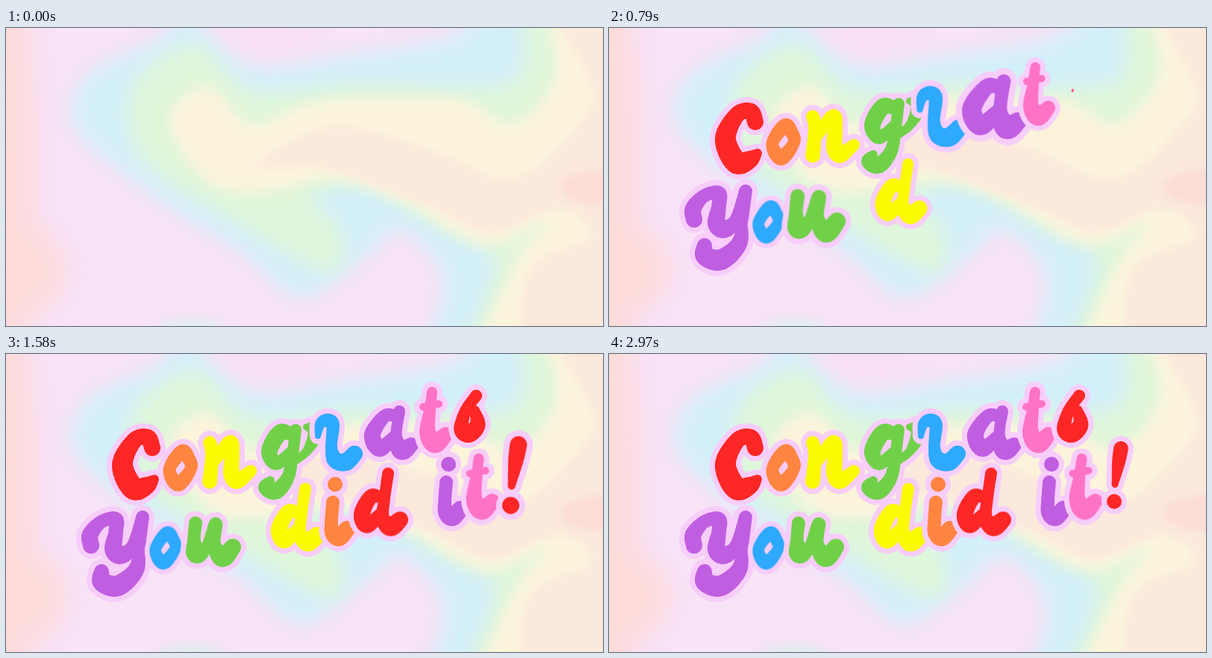
Animation, 800 px wide and 400 px high, one loop 3000 ms. Source, as an HTML page:

```html
<!DOCTYPE html>
<html lang="en">
<head>
<meta charset="utf-8">
<title>Congrats You did it!</title>
<style>
  html, body { margin: 0; width: 100%; height: 100%; overflow: hidden; background: #f9e3f7; }
  svg { display: block; width: 800px; height: 400px; }
  .letter {
    stroke: #f7cdfa; stroke-width: 14; stroke-linejoin: round; paint-order: stroke;
    transform-box: fill-box; transform-origin: center;
  }
</style>
</head>
<body>
<svg viewBox="0 0 800 400" role="img" aria-label="Congrats You did it!">
  <defs id="blurs"></defs>
  <g id="backdrop"></g>
  <g id="words"></g>
</svg>
<script>
const make = (tag, attrs, parent) => {
  const el = document.createElementNS('http://www.w3.org/2000/svg', tag);
  for (const key in attrs) el.setAttribute(key, attrs[key]);
  return parent.appendChild(el);
};

const parse = text => text.split(' ').map(s => s.split(',').map(Number));

// Samples of a Catmull-Rom curve through the key points, in any dimension
const spline = (keys, steps = 10) => {
  const at = i => keys[Math.max(0, Math.min(keys.length - 1, i))];
  const out = [keys[0]];
  for (let i = 0; i < keys.length - 1; i++) {
    const [a, b, c, d] = [at(i - 1), at(i), at(i + 1), at(i + 2)];
    for (let s = 1; s <= steps; s++) {
      const t = s / steps;
      out.push(b.map((v, k) => v + t / 2 * (c[k] - a[k]
        + t * (2 * a[k] - 5 * v + 4 * c[k] - d[k] + t * (3 * (v - c[k]) + d[k] - a[k])))));
    }
  }
  return out;
};

const circle = ([x, y, r]) => `M${x - r} ${y}a${r} ${r} 0 1 0 ${2 * r} 0a${r} ${r} 0 1 0 ${-2 * r} 0Z`;

// Round brush swept along "x,y,radius" keys; strokes are parted by "/"
const brush = text => text.split('/').map(s => spline(parse(s)).map(circle).join('')).join('');

const blurred = (fill, blur, tag, attrs) => {
  const id = 'blur' + blur;
  if (!document.getElementById(id)) {
    const filter = make('filter', { id, filterUnits: 'userSpaceOnUse', x: -150, y: -150, width: 1100,
      height: 700, 'color-interpolation-filters': 'sRGB' }, blurs);
    make('feGaussianBlur', { stdDeviation: blur }, filter);
  }
  make(tag, { fill, filter: `url(#${id})`, ...attrs }, backdrop);
};
const oval = (fill, blur, cx, cy, rx, ry) => blurred(fill, blur, 'ellipse', { cx, cy, rx, ry });
// Everything to the right of a shoreline that runs from top to bottom
const shore = (fill, blur, text) =>
  blurred(fill, blur, 'path', { d: `M${spline(parse(text)).join('L')}L900 470L900 -60Z` });

oval('#fddbda', 16, 0, 200, 38, 320);
oval('#fddbda', 16, 25, 325, 55, 55);
oval('#f9e0f5', 9, 345, 0, 75, 36);
shore('#d3f0fa', 14, '640,-60 605,8 450,38 335,53 272,10 240,-30 205,15 110,62 94,135 205,230 315,300 395,362 480,308 530,270 588,345 540,470');
oval('#d9f2ea', 9, 248, 407, 45, 14);
shore('#e0f6da', 13, '685,-60 692,55 635,80 480,75 330,84 255,22 170,78 182,176 300,255 435,328 447,270 408,228 480,214 590,272 655,322 590,470');
shore('#fbf4db', 9, '705,-60 738,55 680,128 600,95 420,99 330,130 270,78 218,125 270,206 340,220 440,203 530,232 640,290 725,260 685,312 610,470');
shore('#fbe9dc', 4, '705,-60 784,75 765,132 677,202 560,160 435,132 335,185 430,190 570,241 650,275 740,243 783,280 700,328 690,470');
oval('#fcdcd6', 5, 815, 214, 72, 25);

const glyphs = {
  C: '196,126,11 190,112,11 172,116,11 156,148,14 170,180,15 188,177,12 199,168,6',
  o: '237,131,10 249,150,8 231,174,10.5 219,155,8.5 237,131,10 249,150,8',
  n: '273,119,9 276,135,9 273,171,10/278,145,8 300,119,10 303,135,10 302,160,11 310,170,11 328,157,8',
  g: '386,110,8 368,105,11 353,130,11 362,147,9 382,132,8/388,102,8 384,135,8 378,165,9 362,184,11 348,179,10 354,170,6/380,146,7 400,134,6 412,115,9 414,101,10 402,98,4',
  r: '418,110,4 421,94,7 430,89,9 438,95,9 436,125,8 441,142,11 455,145,12 467,134,11',
  a: '522,84,8 508,83,9 491,108,11 501,127,11 521,110,8/527,77,8 523,110,8 530,129,13 543,122,10',
  t: '571,51,7 568,75,8 565,105,11 575,120,13 589,108,10/559,71,5 580,67,5',
  s: '630,56,8 616,76,8 610,100,10 620,107,12 632,95,10.5 628,76,7',
  Y: '114,257,11 113,242,11 128,225,9 147,222,10 147,240,10 144,262,12 154,270,12 170,258,9 183,219,9/183,219,9 179,260,8 174,290,11 150,311,14 129,306,13 128,292,10',
  u: '254,227,9 252,250,9 255,268,13 268,260,8 281,228,9 279,255,9 290,273,13 304,259,11',
  d: '391,213,8 378,212,10 366,235,11 373,250,11 391,235,8/401,181,8 396,215,8 394,240,9 404,252,13 417,243,11',
  i: '438,199,9 436,225,9 437,240,10 446,246,12 457,235,11/441,175,10',
  '!': '686,127,10 683,145,9 678,175,4.5/677,198,10'
};
// shift and size of a letter that comes up a second time
const again = { o: [-1.3, 119.7, .92], d: [111, -20.5, 1], i: [152, -27, 1], t: [62.5, 89.5, 1] };

const inks = { r: '#fd2725', o: '#ff8541', y: '#faf900', g: '#70d148', b: '#2da9fd', v: '#c05ee1', p: '#ff73c6' };

// word, inks, start and time between letters in ms
const script = [
  ['Congrats', 'roygbvpr', 155, 90],
  ['You', 'vbg', 335, 90],
  ['did', 'yor', 695, 120],
  ['it!', 'vpr', 1115, 120]
];

const loop = 3000, rise = 170, settle = 340;
const percent = ms => ms / loop * 100 + '%';
const popAt = (name, start) => `@keyframes ${name} {
  0%, ${percent(start)} { transform: scale(0); animation-timing-function: cubic-bezier(.39, .575, .565, 1) }
  ${percent(start + rise)} { transform: scale(1.19); animation-timing-function: ease-in-out }
  ${percent(start + settle)}, 100% { transform: scale(1) }
}`;

const seen = new Set();
let rules = '';
for (const [word, colours, start, step] of script) {
  [...word].forEach((char, i) => {
    const [x, y, size] = seen.has(char) ? again[char] : [0, 0, 1];
    seen.add(char);
    const name = 'pop' + words.children.length;
    const holder = make('g', { transform: `translate(${x} ${y}) scale(${size})` }, words);
    make('path', { class: 'letter', fill: inks[colours[i]], d: brush(glyphs[char]),
      style: `animation: ${name} ${loop}ms infinite` }, holder);
    rules += popAt(name, start + i * step);
  });
}
document.head.appendChild(document.createElement('style')).textContent = rules;
</script>
</body>
</html>
```
